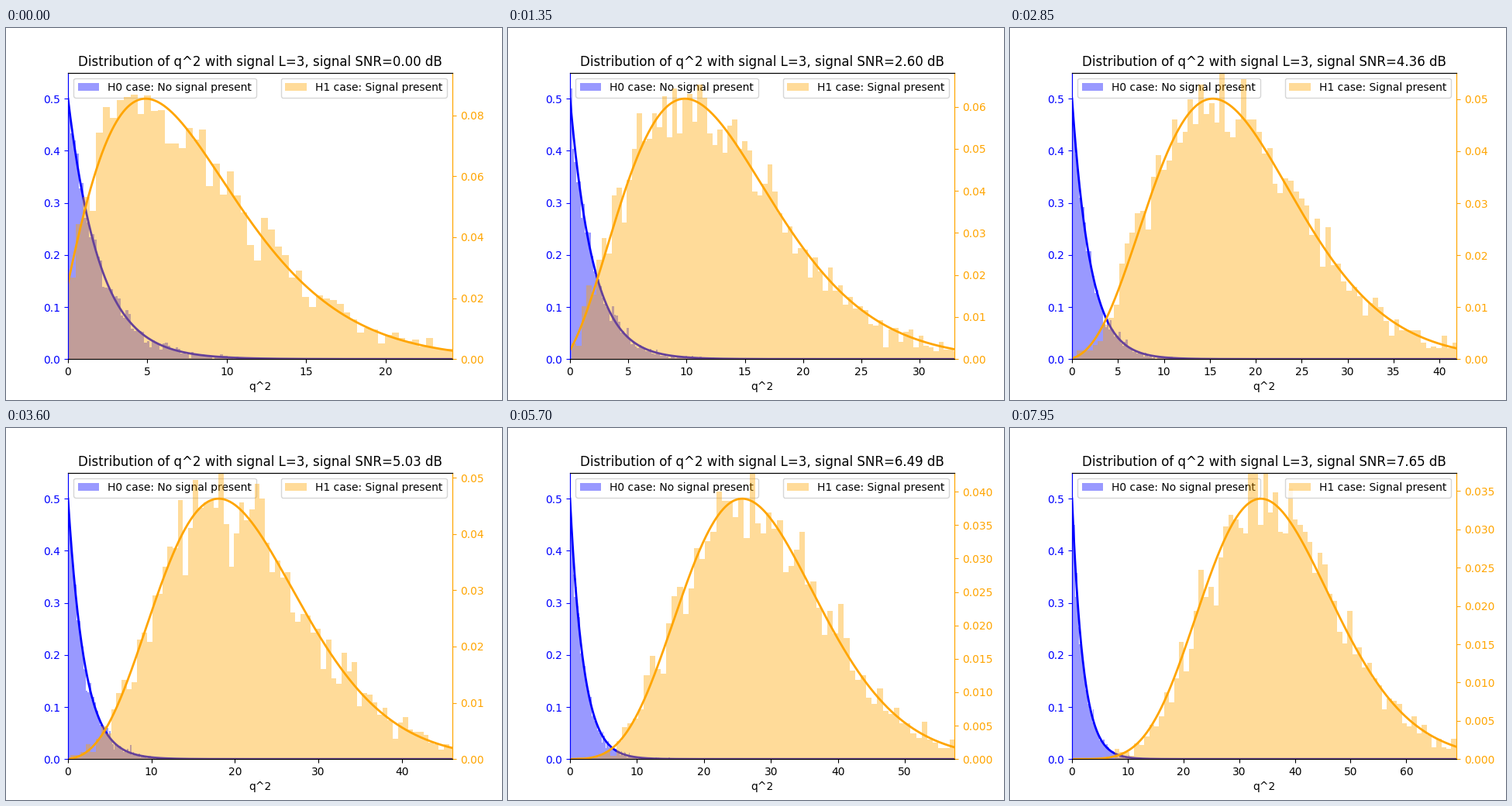
Animation of 640x480 px, one loop 8 s. Source, as a matplotlib script:

```python
import matplotlib.pyplot as plt
import numpy as np
from matplotlib.animation import FuncAnimation

L = 3
SAMPLES = 5000
BINS = 100
TICK_MS = 50
TICKS_PER_STEP = 3
LOOP_MS = 8000
SNRS = np.linspace(1, 10, 100)


def h0_pdf(x):
    """Central chi-squared density, two degrees of freedom."""
    return 0.5 * np.exp(-x / 2)


def h1_pdf(x, shift):
    """Noncentral chi-squared density, two degrees of freedom."""
    return 0.5 * np.exp(-(x + shift) / 2) * np.i0(np.sqrt(shift * x))


def h1_quantile(p, shift):
    x = np.linspace(0, 120, 6001)
    pdf = h1_pdf(x, shift)
    cdf = np.concatenate([[0], np.cumsum((pdf[1:] + pdf[:-1]) / 2 * x[1])])
    return np.interp(p, cdf, x)


def draw_q2(rng, shift):
    a, b = rng.standard_normal((2, SAMPLES))
    return (a + np.sqrt(shift)) ** 2 + b ** 2


def add_case(ax, color, label, loc):
    bars = ax.stairs(np.zeros(BINS), np.arange(BINS + 1), fill=True,
                     color=color, alpha=0.4, label=label)
    curve, = ax.plot([], [], color=color, lw=2)
    ax.tick_params(axis="y", colors=color)
    ax.spines["left"].set_color("blue")
    ax.spines["right"].set_color("orange")
    ax.legend(loc=loc)
    return bars, curve


def show_case(ax, bars, curve, samples, x, pdf):
    density, edges = np.histogram(samples, bins=BINS, density=True)
    bars.set_data(density, edges)
    curve.set_data(x, pdf)
    ax.set_ylim(0, 1.1 * pdf.max())


fig, ax0 = plt.subplots(figsize=(6.4, 4.8), dpi=100)
ax1 = ax0.twinx()
case0 = add_case(ax0, "blue", "H0 case: No signal present", "upper left")
case1 = add_case(ax1, "orange", "H1 case: Signal present", "upper right")
ax0.set_xlabel("q^2")
title = ax0.set_title(" ")


def update(tick):
    step = tick // TICKS_PER_STEP
    snr = SNRS[step]
    shift = 2 * L * snr
    rng = np.random.default_rng(step)
    x = np.linspace(0, h1_quantile(0.99, shift), 1000)

    show_case(ax0, *case0, draw_q2(rng, 0), x, h0_pdf(x))
    show_case(ax1, *case1, draw_q2(rng, shift), x, h1_pdf(x, shift))
    ax0.set_xlim(0, x[-1])
    title.set_text(f"Distribution of q^2 with signal L={L}, "
                   f"signal SNR={10 * np.log10(snr):.2f} dB")
    return *case0, *case1, title


anim = FuncAnimation(fig, update, frames=LOOP_MS // TICK_MS, interval=TICK_MS,
                     repeat=True, repeat_delay=0)
plt.show()
```
